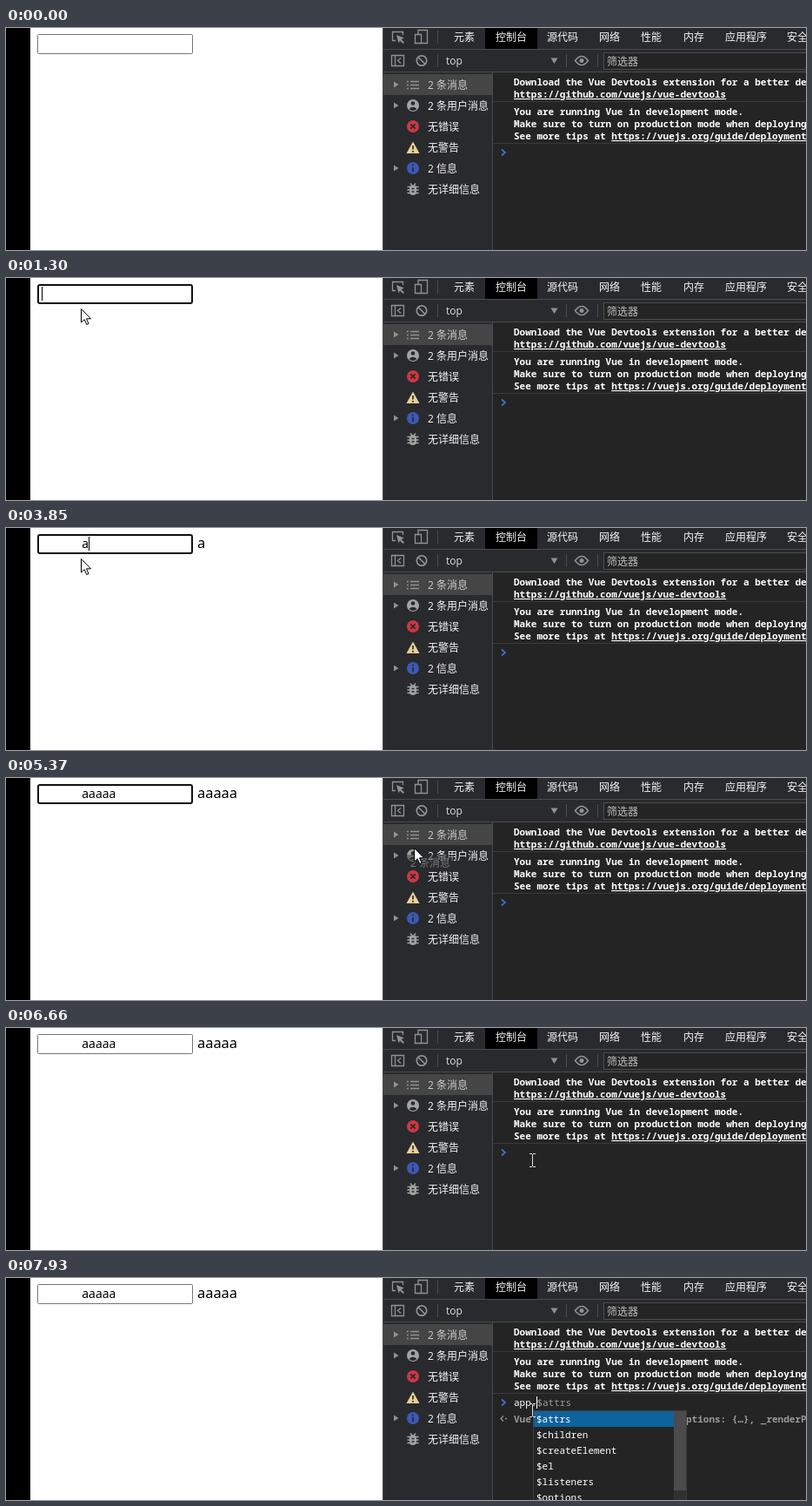
Animation of 920x255 px, one loop 8000 ms. Source, as an HTML page:

```html
<!DOCTYPE html>
<html lang="zh-CN">
<head>
<meta charset="utf-8">
<style>
html, body { margin: 0; width: 920px; height: 255px; overflow: hidden; background: #fff; }
svg { display: block; }
text { white-space: pre; }
.ui { font: 12px "Open Sans", "Noto Sans CJK SC", "Noto Sans CJK", sans-serif; fill: #f4f4f4; }
.mono { font: 500 11px "Noto Sans Mono", "DejaVu Sans Mono", monospace; fill: #fff; }
.log { font-weight: 600; }
.page { font-family: "Noto Sans", "Open Sans", sans-serif; }
.link { text-decoration: underline; }
.icon { fill: none; stroke: #919191; stroke-width: 1.3; }
.gray { fill: #919191; }
</style>
</head>
<body>
<svg width="920" height="255" viewBox="0 0 920 255">
  <rect width="28" height="255"/>

  <rect id="field" fill="#fff"/>
  <text id="typed" class="page" x="87.3" y="23" font-size="13.9"></text>
  <text id="mirror" class="page" x="220" y="23" font-size="16.4"></text>
  <rect id="caret" y="10" width="1" height="16"/>

  <!-- developer tools -->
  <rect x="433" width="487" height="255" fill="#292a2d"/>
  <rect x="560" y="51" width="360" height="204" fill="#242424"/>
  <rect x="551" width="60" height="24" fill="#000"/>
  <rect x="434" y="53" width="125" height="24" fill="#454545"/>
  <path d="M433.5 0V255M433 24.5H920M433 50.5H920M559.5 51V255M496.5 3V18M496.5 30V45M644.5 30V45M680.5 30V45" stroke="#494c50" fill="none"/>
  <path d="M560 84.5H920M560 132.5H920" stroke="#3a3a3a"/>
  <rect x="687.5" y="28.5" width="240" height="19" fill="#242424" stroke="#494c50"/>
  <g id="labels" class="ui"></g>

  <!-- toolbar icons -->
  <g class="icon">
    <path d="M448 14.5H444.5V4.5H456.5V8"/>
    <path class="gray" stroke="none" d="M449 8L458 11.5L454.5 13L458 16.5L456.5 18L453 14.5L451.5 17.5Z"/>
    <path d="M474 7V2.5H484.500V17.500H478M470.500 7.500H477.500V17.500H470.500Z"/>
    <path d="M443.500 31.500H457.500V43.500H443.500ZM447.500 31V44M454 34.500L450.500 37.500L454 40.500"/>
    <circle cx="478" cy="37.500" r="5.700" stroke-width="1.700"/>
    <path d="M474 33.500L482 41.500" stroke-width="1.700"/>
    <path d="M654.500 37.500Q662 27.500 669.500 37.500Q662 47.500 654.500 37.500Z" stroke-width="1.600"/>
    <circle cx="662" cy="37.500" r="2.500" class="gray" stroke="none"/>
  </g>
  <path class="gray" d="M626.500 34.500H634.500L630.500 41ZM446 61.500L451.500 65L446 68.500ZM446 85.500L451.500 89L446 92.500ZM446 157.500L451.500 161L446 164.500Z"/>

  <!-- sidebar icons -->
  <path d="M461 61.500H463M465 61.500H475M461 65.500H463M465 65.500H475M461 69.500H463M465 69.500H475" stroke="#919191" stroke-width="1.500"/>
  <circle cx="468" cy="89" r="7" fill="#a3a3a3"/>
  <path d="M463.500 93Q468 88.500 472.500 93Q468 97 463.500 93Z" fill="#292a2d"/>
  <circle cx="468" cy="86.500" r="2.300" fill="#292a2d"/>
  <circle cx="468" cy="113" r="7" fill="#cb3843"/>
  <path d="M465.300 110.300L470.700 115.700M470.700 110.300L465.300 115.700" stroke="#292a2d" stroke-width="1.700"/>
  <path d="M468 130.500L475.500 144H460.500Z" fill="#e9d196"/>
  <path d="M468 135V139.500M468 141V142.700" stroke="#292a2d" stroke-width="1.700"/>
  <circle cx="468" cy="161" r="7" fill="#3c59b5"/>
  <path d="M468 156.800V158.500M468 160V165.300" stroke="#292a2d" stroke-width="1.700"/>
  <rect x="464" y="180.500" width="8" height="11.500" rx="4" fill="#a3a3a3"/>
  <path d="M461.500 182.500H474.500M461.500 186H474.500M461.500 189.500H474.500M465 178.500L467 181M471 178.500L469 181" stroke="#a3a3a3" stroke-width="1.500"/>
  <path d="M466.500 184.500H469.500M466.500 188H469.500" stroke="#292a2d" stroke-width="1.300"/>

  <!-- console -->
  <g class="mono log">
    <text x="584" y="66">Download the Vue Devtools extension for a better development experience:</text>
    <text x="584" y="80" class="link">https://github.com/vuejs/vue-devtools</text>
    <text x="584" y="100">You are running Vue in development mode.</text>
    <text x="584" y="114">Make sure to turn on production mode when deploying for production.</text>
    <text x="584" y="128">See more tips at <tspan class="link">https://vuejs.org/guide/deployment.html</tspan></text>
  </g>
  <path d="M570 139.500L574 143L570 146.500" fill="none" stroke="#3f70cf" stroke-width="1.700"/>
  <text class="mono" x="584" y="147"><tspan id="command"></tspan><tspan id="ghost" fill="#999"></tspan></text>
  <g id="preview">
    <path d="M572 158.500L569 161.500L572 164.500" class="icon"/>
    <circle cx="575" cy="161.500" r="1" class="gray"/>
    <text class="mono log" x="584" y="166" style="fill:#9a9a9a">Vue {_uid: 0, _isVue: true, $options: {…}, _renderProxy: Proxy}</text>
  </g>
  <rect id="prompt" y="136" width="1" height="14" fill="#fff"/>
  <g id="history" class="mono"></g>
  <g id="members" class="mono"></g>

  <g id="tip" class="ui">
    <rect x="461" y="88" width="54" height="17" fill="#292a2d" opacity=".45"/>
    <text x="465" y="101.500" style="fill:#777">2 条消息</text>
  </g>
  <g id="mouse">
    <path id="arrow" d="M.500 .500V16L4.200 12.700L6.700 18.500L9 17.500L6.500 11.800H11.500Z" fill="#fff" stroke="#000"/>
    <path id="beam" d="M-3 -7.500H0M1 -7.500H4M.500 -7V7M-3 7.500H0M1 7.500H4" fill="none"/>
  </g>
</svg>
<script>
const LOOP = 8000, BLINK = 530;
const FOCUS = 880, BLUR = 6130;
const spaceTimes = [1310, 1410, 1510, 1710, 1840, 2040, 2170, 2370, 2570, 2700, 2900, 3030];
const letterTimes = [3850, 3980, 4180, 4380, 4790];
const commandTimes = [6920, 7060, 7180, 7860];
// time, x, y
const path = [
  [200, 547, 178], [300, 430, 135], [450, 190, 65], [600, 34, 24], [680, 44, 20],
  [1020, 44, 20], [1100, 58, 24], [1240, 86, 35], [4630, 86, 35], [4640, 87, 35],
  [5200, 87, 35], [5300, 340, 62], [5370, 469, 80], [5440, 471, 84], [5570, 500, 130],
  [5760, 546, 168], [5900, 592, 158], [6000, 605, 152]
];

const $ = id => document.getElementById(id);
const show = (id, on) => $(id).style.display = on ? "" : "none";
const set = (id, attrs) => { for (const k in attrs) $(id).setAttribute(k, attrs[k]); };
const count = (times, t) => times.filter(k => k <= t).length;

function addText(group, x, y, str, fill = "") {
  $(group).innerHTML += `<text x="${x}" y="${y}" style="fill:${fill}">${str}</text>`;
}

function addPopup(group, x, y, w, textX, items) {
  const h = items.length * 18;
  $(group).innerHTML = `<rect x="${x - .5}" y="${y - .5}" width="${w + 1}" height="${h + 1}" fill="#242424" stroke="#3d3d3d"/>
    <rect x="${x}" y="${y}" width="${w}" height="18" fill="#0e639c"/>`;
  items.forEach((item, i) => addText(group, textX, y + 13 + i * 18, item));
}

[["元素", 515], ["控制台", 563], ["源代码", 622], ["网络", 682], ["性能", 730],
 ["内存", 779], ["应用程序", 827], ["安全", 898]].forEach(([s, x]) => addText("labels", x, 15, s));
addText("labels", 506, 42, "top", "#ddd");
addText("labels", 691, 42.5, "筛选器", "#bbb");
["2 条消息", "2 条用户消息", "无错误", "无警告", "2 信息", "无详细信息"]
  .forEach((s, i) => addText("labels", 485, 69.5 + 24 * i, s, i ? "" : "#ccc"));

addPopup("history", 570, 77, 176, 584, ["app", "app.$data", "app.$el"]);
addPopup("members", 607, 153, 175, 610,
  ["$attrs", "$children", "$createElement", "$el", "$listeners", "$options"]);
$("members").innerHTML += `<rect x="768" y="153" width="14" height="102" fill="#303030"/>
  <rect x="768" y="153" width="14" height="91" fill="#4b4b4b"/>`;

function mouseAt(t) {
  const i = path.findIndex(p => p[0] > t);
  if (i < 0) return path[path.length - 1].slice(1);
  if (!i) return [-50, -50];
  const [t0, x0, y0] = path[i - 1], [t1, x1, y1] = path[i], f = (t - t0) / (t1 - t0);
  return [Math.round(x0 + (x1 - x0) * f), Math.round(y0 + (y1 - y0) * f)];
}

// A caret restarts its blink at each key press.
function caretOn(t, times) {
  const last = Math.max(...times.filter(k => k <= t));
  return (t - last) % (2 * BLINK) < BLINK;
}

function draw(t) {
  const [x, y] = mouseAt(t);
  const overField = x > 36 && x < 215 && y > 7 && y < 30;
  const overConsole = x > 560 && y > 51;
  const beam = overField || overConsole;
  set("mouse", { transform: `translate(${x} ${y})` });
  set("beam", { stroke: overConsole ? "#ddd" : "#000" });
  show("beam", beam);
  show("arrow", !beam);
  show("tip", t >= 5340 && t < 5470);

  const focused = t >= FOCUS && t < BLUR;
  const inset = focused ? 1 : .5;
  set("field", {
    x: 36 + inset, y: 7 + inset, width: 179 - 2 * inset, height: 23 - 2 * inset,
    rx: focused ? 2 : 1, "stroke-width": 2 * inset,
    stroke: focused ? "#101010" : overField ? "#444" : "#767676"
  });
  const spaces = count(spaceTimes, t), letters = count(letterTimes, t);
  $("typed").textContent = $("mirror").textContent = "a".repeat(letters);
  set("caret", { x: Math.floor(letters ? 87.6 + 7.8 * letters : 41.3 + 3.9 * spaces) });
  show("caret", focused && caretOn(t, [FOCUS, ...spaceTimes, ...letterTimes]));

  const keys = count(commandTimes, t), members = t >= 7930;
  $("command").textContent = "app.".slice(0, keys);
  $("ghost").textContent = members ? "$attrs" : "";
  set("prompt", { x: Math.round(584 + 6.6 * keys) });
  show("prompt", t >= BLUR && caretOn(t, [BLUR, ...commandTimes]));
  show("preview", t >= 7200);
  show("history", t >= 7000 && t < 7860);
  show("members", members);
}

const start = performance.now();
function frame() {
  draw((performance.now() - start) % LOOP);
  requestAnimationFrame(frame);
}
frame();
</script>
</body>
</html>
```
